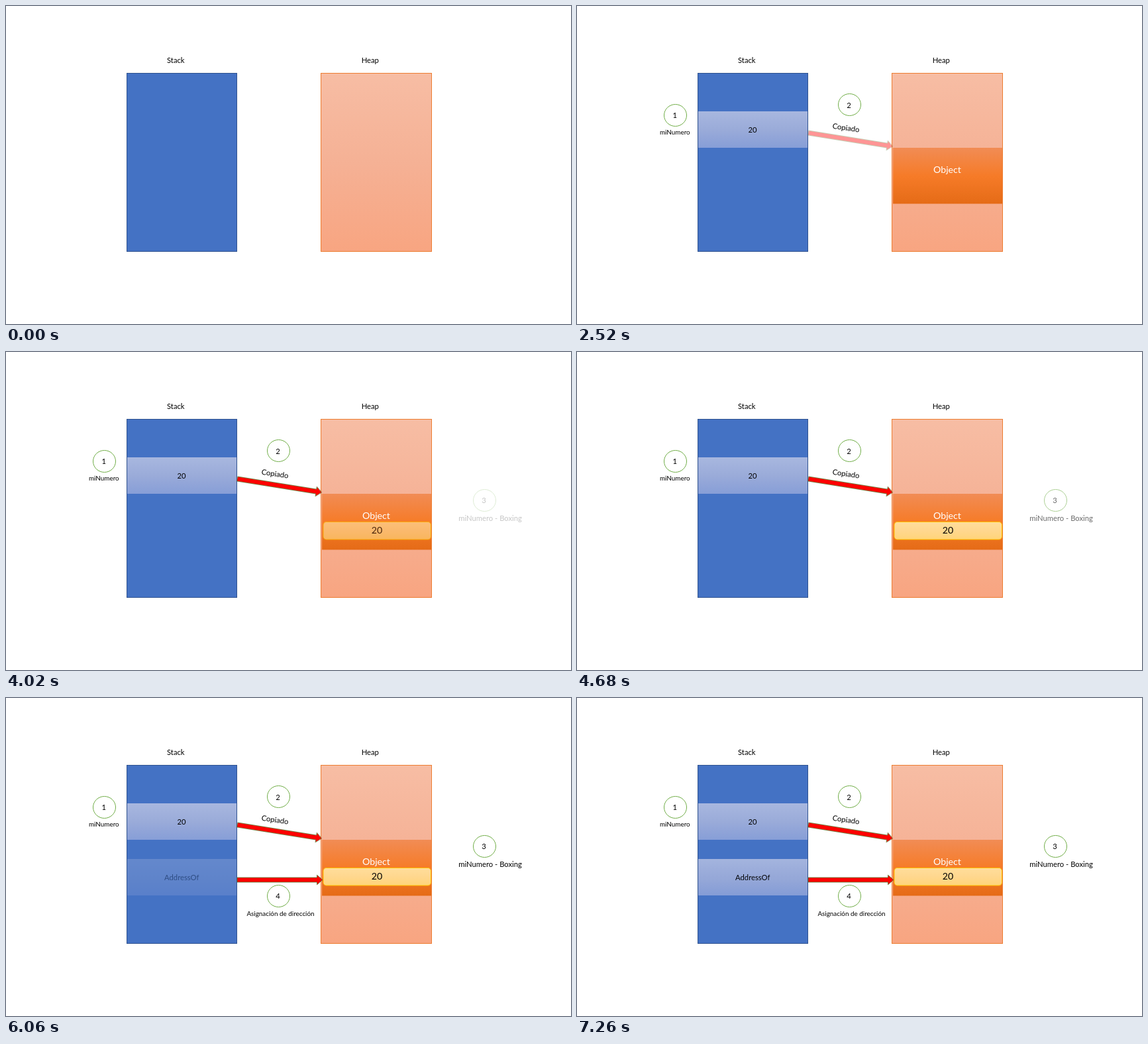
An HTML page for the animation above (7320 ms loop, 853 by 480 pixels).

```html
<!DOCTYPE html>
<html lang="es">
<head>
<meta charset="utf-8">
<title>Boxing</title>
<style>
  html, body { margin: 0; width: 100%; height: 100%; overflow: hidden; background: #fff; }
  svg { display: block; width: 853px; height: 480px; }
  text { font: 11.25px Lato, Carlito, sans-serif; text-anchor: middle; fill: #000; }
  .small { font-size: 9.9px; }
  .big { font-size: 14.2px; }
  .ring { fill: #fff; stroke: #70ad47; }
  .arrow { fill: #f00; stroke: #507e32; stroke-width: .8; }

  /* Four stages: in each, some parts appear fast and one fades in slowly. */
  .fast, .slow { opacity: 0; animation: 7.32s -1ms infinite; }
  .fast { animation-timing-function: steps(10); }
  .slow { animation-timing-function: steps(31); }
  .one.fast { animation-name: fast1; }
  .one.slow { animation-name: slow1; animation-timing-function: steps(29); }
  .two.fast { animation-name: fast2; }
  .two.slow { animation-name: slow2; }
  .three.fast { animation-name: fast3; }
  .three.slow { animation-name: slow3; }
  .four.fast { animation-name: fast4; }
  .four.slow { animation-name: slow4; }

  @keyframes fast1 { 0% { opacity: 0 } 8.1967%, 100% { opacity: 1 } }
  @keyframes slow1 { 0% { opacity: 0 } 23.7705%, 100% { opacity: 1 } }
  @keyframes fast2 { 0%, 23.7705% { opacity: 0 } 31.9672%, 100% { opacity: 1 } }
  @keyframes slow2 { 0%, 23.7705% { opacity: 0 } 49.1803%, 100% { opacity: 1 } }
  @keyframes fast3 { 0%, 49.1803% { opacity: 0 } 57.377%, 100% { opacity: 1 } }
  @keyframes slow3 { 0%, 49.1803% { opacity: 0 } 74.5902%, 100% { opacity: 1 } }
  @keyframes fast4 { 0%, 74.5902% { opacity: 0 } 82.7869%, 100% { opacity: 1 } }
  @keyframes slow4 { 0%, 74.5902% { opacity: 0 } 100% { opacity: 1 } }
</style>
</head>
<body>
<svg viewBox="0 0 853 480">
  <defs>
    <linearGradient id="peach" x2="0" y2="1">
      <stop stop-color="#f7bda4"/><stop offset=".5" stop-color="#f5b195"/><stop offset="1" stop-color="#f8a581"/>
    </linearGradient>
    <linearGradient id="sky" x2="0" y2="1">
      <stop stop-color="#a8b7df"/><stop offset=".5" stop-color="#9aabd9"/><stop offset="1" stop-color="#879ed7"/>
    </linearGradient>
    <linearGradient id="orange" x2="0" y2="1">
      <stop stop-color="#f18c55"/><stop offset=".5" stop-color="#f67b28"/><stop offset="1" stop-color="#e56b17"/>
    </linearGradient>
    <linearGradient id="gold" x2="0" y2="1">
      <stop stop-color="#ffdd9c"/><stop offset=".5" stop-color="#ffd78e"/><stop offset="1" stop-color="#ffd479"/>
    </linearGradient>
    <ellipse id="ring" class="ring" rx="17" ry="16.5"/>
    <path id="arrow" class="arrow" d="M0-3.5H120.5V-7.3L129-0L120.5 7.3V3.5H0Z"/>
  </defs>

  <text x="256.3" y="86">Stack</text>
  <text x="549.8" y="86">Heap</text>
  <rect x="182.5" y="101.5" width="166" height="269" fill="#4472c4" stroke="#2f528f"/>
  <rect x="475.5" y="101.5" width="167" height="269" fill="url(#peach)" stroke="#ed7d31"/>

  <g class="one fast">
    <use href="#ring" x="148.5" y="165"/>
    <text x="147.7" y="169">1</text>
    <text class="small" x="147.8" y="194">miNumero</text>
  </g>
  <g class="one slow">
    <rect x="183" y="159" width="165" height="55" fill="url(#sky)"/>
    <text x="265" y="191">20</text>
  </g>

  <g class="two fast">
    <use href="#ring" x="411.5" y="149"/>
    <text x="410.5" y="154">2</text>
    <text transform="translate(405.5 187.7) rotate(8.5)">Copiado</text>
    <rect x="477" y="214" width="165" height="84.5" fill="url(#orange)"/>
    <text class="big" x="559" y="252" style="fill:#fff">Object</text>
  </g>
  <g class="two slow">
    <use href="#arrow" transform="translate(349.2 191.5) rotate(9.1)"/>
  </g>

  <g class="three fast">
    <rect x="479" y="256.5" width="162.5" height="26.5" rx="4.5" fill="url(#gold)" stroke="#ffc000"/>
    <text class="big" x="560" y="274">20</text>
  </g>
  <g class="three slow">
    <use href="#ring" x="722.5" y="224"/>
    <text x="721.6" y="228">3</text>
    <text x="731" y="255">miNumero - Boxing</text>
  </g>

  <g class="four fast">
    <use href="#arrow" x="349" y="274.5"/>
    <use href="#ring" x="411.5" y="299"/>
    <text x="410.5" y="303">4</text>
    <text class="small" x="414.5" y="329">Asignación de dirección</text>
  </g>
  <g class="four slow">
    <rect x="183" y="243" width="165" height="55" fill="url(#sky)"/>
    <text x="265.3" y="275">AddressOf</text>
  </g>
</svg>
</body>
</html>
```
